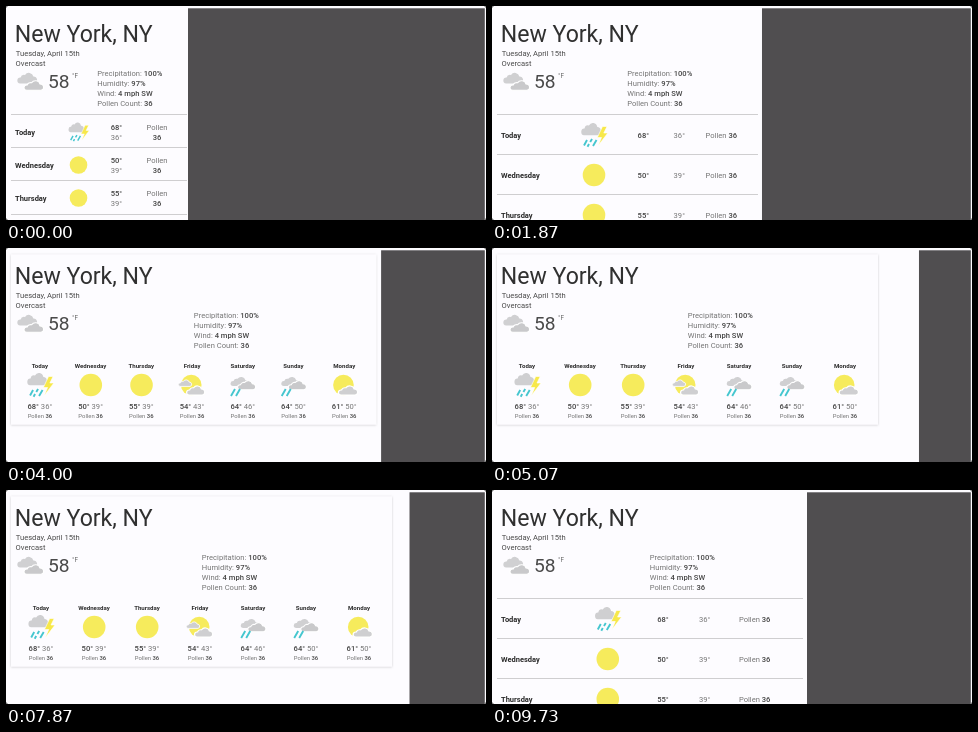
Animation of 480x214 px, one loop 9790 ms. Source, as an HTML page:

```html
<!DOCTYPE html>
<html lang="en">
<head>
<meta charset="utf-8">
<title>Responsive weather card</title>
<style>
  html, body { margin: 0; width: 100%; height: 100%; overflow: hidden; background: #fdfcff; }
  svg { position: fixed; left: 0; top: 0; width: 480px; height: 214px; display: block; }
  text { font-family: Roboto, "Open Sans", sans-serif; font-size: 7.6px; fill: #4a4a4a; white-space: pre; }
  .title { font-size: 23.1px; fill: #303030; }
  .now { font-size: 19.2px; }
  .unit { font-size: 6.4px; fill: #666; }
  .name { font-size: 7.5px; font-weight: 700; fill: #2b2b2b; }
  .soft, tspan.soft { fill: #757575; }
  .val { fill: #444; font-weight: 500; }
  .tiny { font-size: 5.9px; }
  .day { font-size: 6.1px; }
  .mid { text-anchor: middle; }
  .line { stroke: #cfced0; stroke-width: 1; }
</style>
</head>
<body>
<svg viewBox="0 0 480 214">
  <defs>
    <path id="cloud" d="M-7.5 6A3 3 0 0 1-7 0A3.6 3.6 0 0 1-2.6-2.6A4.6 4.6 0 0 1 5.8-1.2A3.7 3.7 0 0 1 7 6Z"/>
    <circle id="sun" r="11.3" fill="#f6eb5c"/>
    <g id="storm">
      <use href="#cloud" transform="translate(-2.5 -6.6) scale(1 1.15)" fill="#cfcfd1"/>
      <path d="M8.5-8.5L3.3 2.5H7.5L4.2 10.5L13.8-2H9.8L13-8.5Z" fill="#f7e84a" stroke="#fff" stroke-width=".6"/>
      <path d="M-7 5l-3 5.5M-2 4l-1.8 3M-5 9l-1.5 2.7M2.5 5l-3.5 6" stroke="#45c6cf" stroke-width="1.9"/>
    </g>
    <g id="partly">
      <circle cx="-1" r="10.3" fill="#f6eb5c"/>
      <use href="#cloud" transform="translate(-7 -2.2) scale(.68 .6)" fill="#cfcfd1" stroke="#fff" stroke-width="1.3"/>
      <use href="#cloud" transform="translate(3.8 5) scale(.92 .85)" fill="#cfcfd1" stroke="#fff" stroke-width="1.3"/>
    </g>
    <g id="fair">
      <circle cx="-1" r="10.3" fill="#f6eb5c"/>
      <use href="#cloud" transform="translate(4 5) scale(.98 .85)" fill="#cfcfd1" stroke="#fff" stroke-width="1.3"/>
    </g>
    <g id="clouds">
      <use href="#cloud" transform="translate(-3.4 -3.4)" fill="#d0d0d2"/>
      <use href="#cloud" transform="translate(3.2 4) scale(1 .88)" fill="#c9c9cb" stroke="#fff" stroke-width="1.2"/>
    </g>
    <g id="rain">
      <use href="#cloud" transform="translate(-3 -4) scale(.92 .85)" fill="#d0d0d2"/>
      <use href="#cloud" transform="translate(4 -.3) scale(.92 .85)" fill="#c9c9cb" stroke="#fff" stroke-width="1.2"/>
      <path d="M-8 4l-4 7M-3 4l-4 7" stroke="#45c6cf" stroke-width="1.9"/>
    </g>
    <filter id="shade" x="-5%" y="-5%" width="110%" height="112%">
      <feDropShadow dx="0" dy=".5" stdDeviation=".8" flood-color="#000" flood-opacity=".2"/>
    </filter>
  </defs>
  <g id="scene"></g>
</svg>
<script>
const LOOP = 9790, STEP = 1000 / 15;
const WIDE_ROWS = 256, COLUMNS = 341, MAX = 391;

// [time in ms, page width]
const WIDTHS = [
  [0, 182], [1867, 270], [3133, 332], [4933, 421.5], [5000, 421.5], [5067, 427],
  [5533, 451], [5600, 451], [6133, 475.5], [6200, 478], [6267, 478],
  [6800, 456], [7867, 403.5], [9733, 315]
];

// name, icon, high, low
const DAYS = [
  ["Today", "storm", 68, 36], ["Wednesday", "sun", 50, 39], ["Thursday", "sun", 55, 39],
  ["Friday", "partly", 54, 43], ["Saturday", "rain", 64, 46], ["Sunday", "rain", 64, 50],
  ["Monday", "fair", 61, 50]
];
const FACTS = [["Precipitation", "100%"], ["Humidity", "97%"], ["Wind", "4 mph SW"], ["Pollen Count", "36"]];

const scene = document.getElementById("scene");

const text = (x, y, cls, body) => `<text x="${x}" y="${y}" class="${cls}">${body}</text>`;
const span = (cls, body) => `<tspan class="${cls}">${body}</tspan>`;
const icon = (id, x, y, s = 1) => `<use href="#${id}" transform="translate(${x} ${y}) scale(${s})"/>`;
const rule = (y, right) => `<path class="line" d="M5 ${y}H${right}"/>`;
const rect = (x, y, w, h, extra) => `<rect x="${x}" y="${y}" width="${w}" height="${h}" ${extra}/>`;

function widthAt(t) {
  const i = WIDTHS.findIndex(p => p[0] > t);
  if (i < 0) return WIDTHS[WIDTHS.length - 1][1];
  const [t0, w0] = WIDTHS[i - 1], [t1, w1] = WIDTHS[i];
  return w0 + (w1 - w0) * (t - t0) / (t1 - t0);
}

function header(w) {
  const x = Math.min(w, MAX) / 2 + 0.3;
  return text(8.7, 35.6, "title", "New York, NY") +
    text(9.8, 49.7, "", "Tuesday, April 15th") +
    text(9.6, 59.7, "", "Overcast") +
    icon("clouds", 25, 75) +
    text(42, 82, "now", "58") +
    text(66, 71.5, "unit", "°F") +
    FACTS.map(([k, v], i) => text(x, 69.7 + i * 10, "soft", k + ": " + span("val", v))).join("");
}

function smallRow([name, id, hi, lo], i, w) {
  const y = 126 + i * 33, x = 0.4355 * w + 25.4, p = 0.742 * w + 16;
  return rule(141.5 + i * 33 + (i > 1), w - 1) +
    text(9, y + 2.7, "name", name) +
    icon(id, 0.306 * w + 16.8, y, 0.78) +
    text(x, y - 2.3, "val", hi + "°") + text(x, y + 7.7, "soft", lo + "°") +
    text(p, y - 2.3, "soft mid", "Pollen") + text(p, y + 7.7, "val mid", "36");
}

function wideRow([name, id, hi, lo], i, w) {
  const y = 129 + i * 40, base = y + 2.7;
  return rule(148.5 + i * 40, w - 4) +
    text(9, base, "name", name) +
    icon(id, 0.306 * w + 19.4, y) +
    text(0.4355 * w + 28, base, "val", hi + "°") +
    text(0.5645 * w + 29.2, base, "soft", lo + "°") +
    text(0.742 * w + 13.2, base, "soft", "Pollen " + span("val", "36"));
}

function column([name, id, hi, lo], i, w) {
  const step = (Math.min(w, MAX) - 20) / 7, x = 8.5 + step * (i + 0.5);
  return text(x, 120.2, "name day mid", name) +
    icon(id, x + 0.2, 137) +
    text(x, 161, "soft mid", span("val", hi + "°") + " " + lo + "°") +
    text(x, 170, "soft mid tiny", "Pollen " + span("val", "36"));
}

function forecast(w) {
  if (w >= COLUMNS) return DAYS.map((d, i) => column(d, i, w)).join("");
  const wide = w >= WIDE_ROWS, row = wide ? wideRow : smallRow;
  return rule(108.5, w - (wide ? 4 : 1)) + DAYS.slice(0, 3).map((d, i) => row(d, i, w)).join("");
}

function draw(w) {
  const card = w >= COLUMNS
    ? rect(5, 6.5, Math.min(w, MAX) - 10, 170, 'fill="#fdfcff" filter="url(#shade)"')
    : "";
  scene.innerHTML = rect(0, 0, 480, 214, 'fill="#fdfcff"') + card + header(w) + forecast(w) +
    rect(w, 2.3, Math.max(0, 478.8 - w), 212, 'fill="#504e50"') +
    '<path d="M0 0H2L0 2ZM480 0H478L480 2ZM0 214H2L0 212ZM480 214H478L480 212Z" fill="#777"/>';
}

let shown = -1;
const start = performance.now();
function tick(now) {
  const t = Math.max(0, now - start) % LOOP;
  const step = Math.floor((t + 3.4) / STEP);
  if (step !== shown) {
    shown = step;
    draw(widthAt(step * STEP));
  }
  requestAnimationFrame(tick);
}
tick(start);
</script>
</body>
</html>
```
